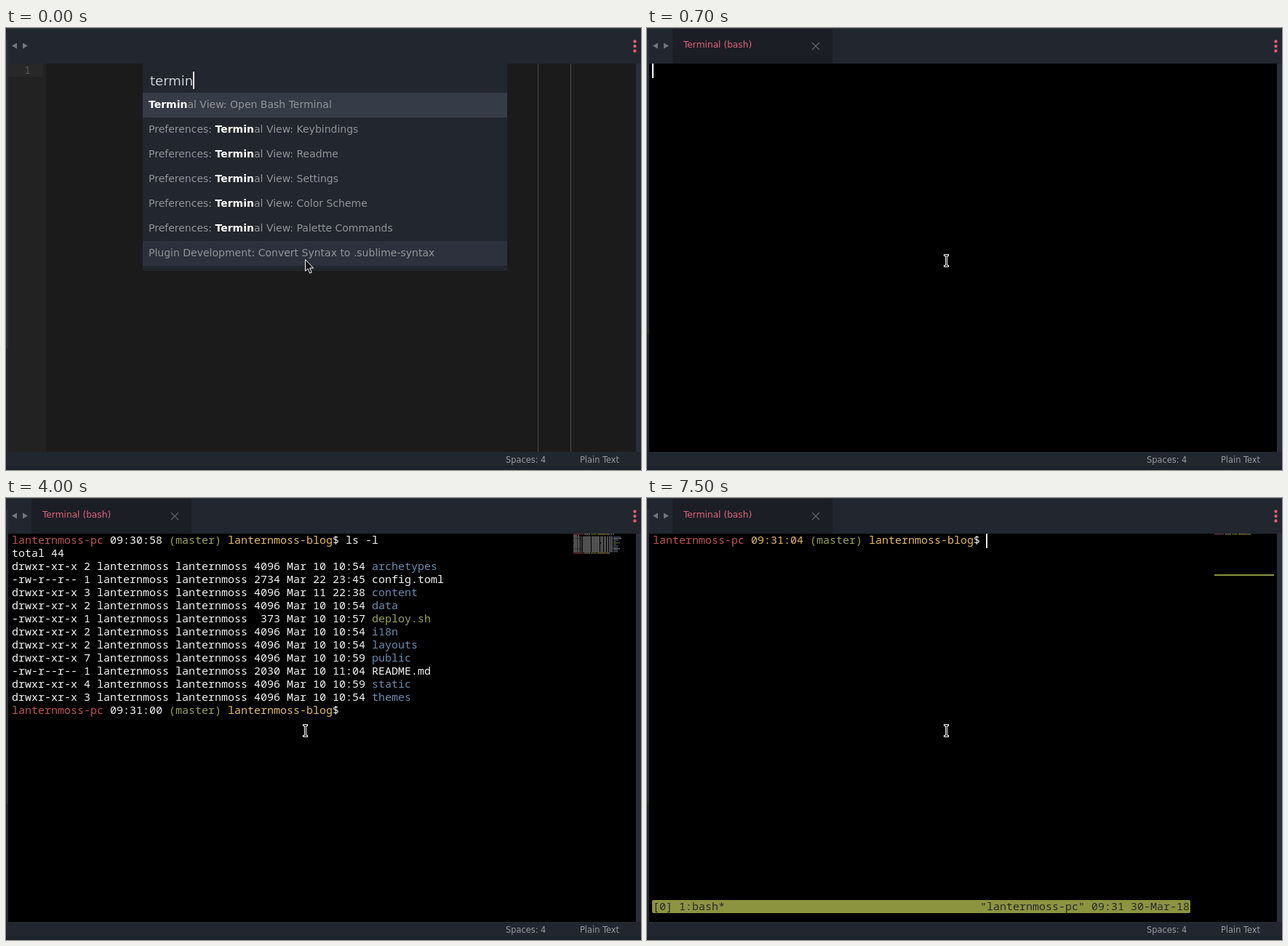
An HTML page with a canvas that plays this animation: 873x608 px, repeating every 8000 ms.

```html
<!DOCTYPE html>
<html lang="en">
<head>
<meta charset="utf-8">
<title>Terminal in an editor</title>
<style>
  html, body { margin: 0; width: 100%; height: 100%; overflow: hidden; background: #22262e; }
  body { position: relative; font-family: "DejaVu Sans", sans-serif; }
  div, pre, svg, canvas { position: absolute; left: 0; top: 0; margin: 0; white-space: pre; }
  #topline { width: 873px; height: 1px; background: #3b3e41; }
  #leftEdge { top: 16px; width: 3px; background: #2b303b; }
  #rightEdge { left: 866px; top: 49px; width: 7px; height: 534px; background: #292e39; }
  #bottomEdge { top: 603px; width: 873px; height: 5px; background: #1e222a; }
  .status { top: 586px; line-height: 16px; font-size: 11.4px; color: #999b9e; }

  #editor { left: 3px; top: 49px; width: 863px; height: 534px; background: #1b1b1b; }
  #gutter { width: 52px; height: 534px; background: #222; }
  #lineNumber { top: -1px; width: 31px; height: 19px; padding-right: 17px; background: #272827; color: #565656;
    font: 15px/18px "Noto Sans Mono", monospace; text-align: right; clip-path: inset(1px 0 0); }
  .ruler { width: 1px; height: 534px; background: #4b4b4b; }
  .caret { width: 2px; height: 22px; background: #fff; }
  #editorCaret { left: 52px; height: 20px; }

  #palette { left: 188px; top: 49px; width: 501px; background: #22262e; }
  #query { left: 10px; top: 10px; line-height: 27px; font-size: 18px; color: #c9ccd0; }
  #query i { display: inline-block; width: 2px; height: 24px; background: #e4e4e4; vertical-align: -5px; }
  .row { width: 493px; height: 34px; padding-left: 8px; line-height: 33px; font-size: 14px; color: #929497; }
  .row b { color: #fff; }
  .row.selected { background: #353b47; }
  .row.hover { background: #2c313d; }

  #tab { left: 35px; top: 1px; width: 220px; height: 48px; background: #1b1e25; }
  #tab div { left: 15px; top: 14px; line-height: 17px; font-size: 12.2px; color: #e0637a; }
  #terminal { left: 3px; top: 49px; width: 863px; height: 534px; background: #000; overflow: hidden; }
  #screen { left: 5px; top: -1px; font: 15px/18px "Noto Sans Mono", monospace; color: #f4f4f4; }
  #tmuxBar { left: 4px; top: 504px; width: 740px; height: 18px; border-radius: 2px; background: #8c9440; }
  #minimap { left: 777px; }
  .red { color: #bf5353; }
  .green { color: #98a44c; }
  .yellow { color: #e6bb5c; }
  .blue { color: #6a8cae; }
  .dark { color: #282a2e; }
</style>
</head>
<body>
<div id="topline"></div>
<div id="leftEdge"></div>
<div id="rightEdge"></div>
<div id="bottomEdge"></div>
<div class="status" style="left:687px">Spaces: 4</div>
<div class="status" style="left:789px">Plain Text</div>

<div id="editor">
  <div id="gutter"></div>
  <div id="lineNumber">1</div>
  <div class="ruler" style="left:728px"></div>
  <div class="ruler" style="left:773px"></div>
  <div class="caret" id="editorCaret"></div>
</div>

<div id="palette"></div>

<div id="terminal">
  <div id="tmuxBar"></div>
  <pre id="screen"></pre>
  <canvas id="minimap" width="82" height="60"></canvas>
  <div class="caret" id="termCaret"></div>
</div>

<div id="tab">
  <div>Terminal (bash)</div>
  <svg width="220" height="48"><path d="M192 19l10 10m0-10l-10 10" stroke="#5b5f66" stroke-width="1.4"/></svg>
</div>

<svg width="873" height="608">
  <path d="M8 24.5l7-4v8zM30 24.5l-7-4v8z" fill="#73777d"/>
  <g fill="#df5c70">
    <circle cx="864.5" cy="18.5" r="2.2"/><circle cx="864.5" cy="25" r="2.2"/><circle cx="864.5" cy="31.5" r="2.2"/>
  </g>
  <path id="arrow" d="M411.5 318.5v16l3.6-3.4 2.6 6.2 2.6-1.1-2.6-6h5z" fill="#111" stroke="#fff"/>
  <g id="beam" fill="none">
    <path d="M408 312.5h7M408 327.5h7M411.5 312.5v15" stroke="#fff" stroke-width="3"/>
    <path d="M409 312.5h5M409 327.5h5M411.5 312.5v15" stroke="#000"/>
  </g>
</svg>

<script>
const LOOP = 8000;
const COLS = 82;
const $ = id => document.getElementById(id);
const show = (id, on) => { $(id).style.display = on ? '' : 'none'; };

// Each line is a list of [class, text] runs.
const user = 'lanternmoss';
const prompt = (time, timeColor) => [
  ['red', user + '-pc'], [timeColor, ` ${time} `], ['green', '(master) '],
  ['yellow', user + '-blog'], ['', '$ ']
];
const entry = ([mode, links, size, date, name, color]) => [
  ['', `${mode} ${links} ${user} ${user} ${size.padStart(4)} Mar ${date} `], [color, name]
];
const DIR = 'drwxr-xr-x', FILE = '-rw-r--r--';
const listing = [
  [['', 'total 44']],
  ...[
    [DIR, 2, '4096', '10 10:54', 'archetypes', 'blue'],
    [FILE, 1, '2734', '22 23:45', 'config.toml', ''],
    [DIR, 3, '4096', '11 22:38', 'content', 'blue'],
    [DIR, 2, '4096', '10 10:54', 'data', 'blue'],
    ['-rwxr-xr-x', 1, '373', '10 10:57', 'deploy.sh', 'green'],
    [DIR, 2, '4096', '10 10:54', 'i18n', 'blue'],
    [DIR, 2, '4096', '10 10:54', 'layouts', 'blue'],
    [DIR, 7, '4096', '10 10:59', 'public', 'blue'],
    [FILE, 1, '2030', '10 11:04', 'README.md', ''],
    [DIR, 4, '4096', '10 10:59', 'static', 'blue'],
    [DIR, 3, '4096', '10 10:54', 'themes', 'blue']
  ].map(entry)
];
const clock = `"${user}-pc" 09:31 30-Mar-18`;
const tmuxStatus = [['dark', '[0] 1:bash*'.padEnd(COLS - clock.length) + clock]];

const paletteItems = [
  '*al View: Open Bash Terminal',
  ...['Keybindings', 'Readme', 'Settings', 'Color Scheme', 'Palette Commands']
    .map(s => 'Preferences: *al View: ' + s),
  'Plugin Development: Convert Syntax to .sublime-syntax'
];

const at = (t, steps) => steps.filter(s => s[0] <= t).pop()[1];
const command = t => at(t, [[0, ''], [1600, 'l'], [1700, 'ls'], [1800, 'ls -'], [1900, 'ls -l'],
  [2100, ''], [2700, 't'], [3200, ''], [4600, 't'], [4700, 'tm'], [4900, 'tmu'], [5000, 'tmux'], [6200, '']]);
const blinkedOff = t => [4000, 5800, 7100].some(start => t >= start && t < start + 400);

function terminalLines(t) {
  const input = ['', command(t)];
  if (t < 1100) return [[]];
  if (t < 2100) return [[...prompt('09:30:58', ''), input]];
  if (t < 6200) return [[...prompt('09:30:58', ''), ['', 'ls -l']], ...listing,
    [...prompt('09:31:00', ''), input]];
  return [t < 6300 ? [] : prompt('09:31:04', 'yellow')];
}

const textOf = line => line.map(run => run[1]).join('');
const html = line => line.map(([c, s]) => `<span class="${c}">${s}</span>`).join('');

function drawMinimap(lines, tmux) {
  const ctx = $('minimap').getContext('2d');
  const ink = { '': '#d0d0d0', red: '#bf5353', green: '#98a44c', yellow: '#e6bb5c', blue: '#6a8cae' };
  ctx.clearRect(0, 0, 82, 60);
  lines.forEach((line, row) => {
    let col = 0;
    for (const [color, text] of line) for (const ch of text) {
      if (ch !== ' ') {
        ctx.fillStyle = ink[color];
        ctx.globalAlpha = '-.:'.includes(ch) ? 0.3 : 0.55;
        ctx.fillRect(col, row * 2, 1, 1);
        ctx.globalAlpha *= 0.4;
        ctx.fillRect(col, row * 2 + 1, 1, 1);
      }
      col++;
    }
  });
  ctx.globalAlpha = 1;
  ctx.fillStyle = '#8c9440';
  if (tmux) ctx.fillRect(0, 56, COLS, 2);
}

function drawTerminal(t) {
  const lines = terminalLines(t), tmux = t >= 6200;
  const rows = lines.map(html);
  if (tmux) rows[28] = html(tmuxStatus);
  $('screen').innerHTML = Array.from(rows, r => r || '').join('\n');
  show('tmuxBar', tmux);
  drawMinimap(lines, tmux);
  const last = lines.length - 1;
  $('termCaret').style.left = 4 + 9 * textOf(lines[last]).length + 'px';
  $('termCaret').style.top = 18 * last - 2 + 'px';
  show('termCaret', !blinkedOff(t));
}

function drawPalette(t) {
  const query = t < 200 ? 'termin' : 'termina';
  const items = t < 200 ? paletteItems : paletteItems.slice(0, 6);
  const row = (item, i) => {
    const text = item.replace('*al', 'Terminal')
      .replace(/Terminal(?= View)/, m => `<b>${m.slice(0, query.length)}</b>${m.slice(query.length)}`);
    const state = i === 0 ? 'selected' : i === 6 ? 'hover' : '';
    return `<div class="row ${state}" style="top:${40 + 34 * i}px">${text}</div>`;
  };
  $('palette').style.height = 47 + 34 * items.length + 'px';
  $('palette').innerHTML = `<div id="query">${query}<i></i></div>` + items.map(row).join('');
}

function draw(t) {
  const inTerminal = t >= 700;
  show('palette', t < 500);
  show('editorCaret', t >= 600);
  show('terminal', inTerminal);
  show('tab', inTerminal);
  show('arrow', t < 200);
  show('beam', t >= 200);
  $('leftEdge').style.height = (inTerminal ? 405 : 425) + 'px';
  if (inTerminal) drawTerminal(t);
  else drawPalette(t);
}

// Everything changes on a 100 ms beat.
let shown = -1;
const start = performance.now();
function tick() {
  const t = Math.floor((performance.now() - start) % LOOP / 100) * 100;
  if (t !== shown) draw(shown = t);
  requestAnimationFrame(tick);
}
tick();
</script>
</body>
</html>
```
